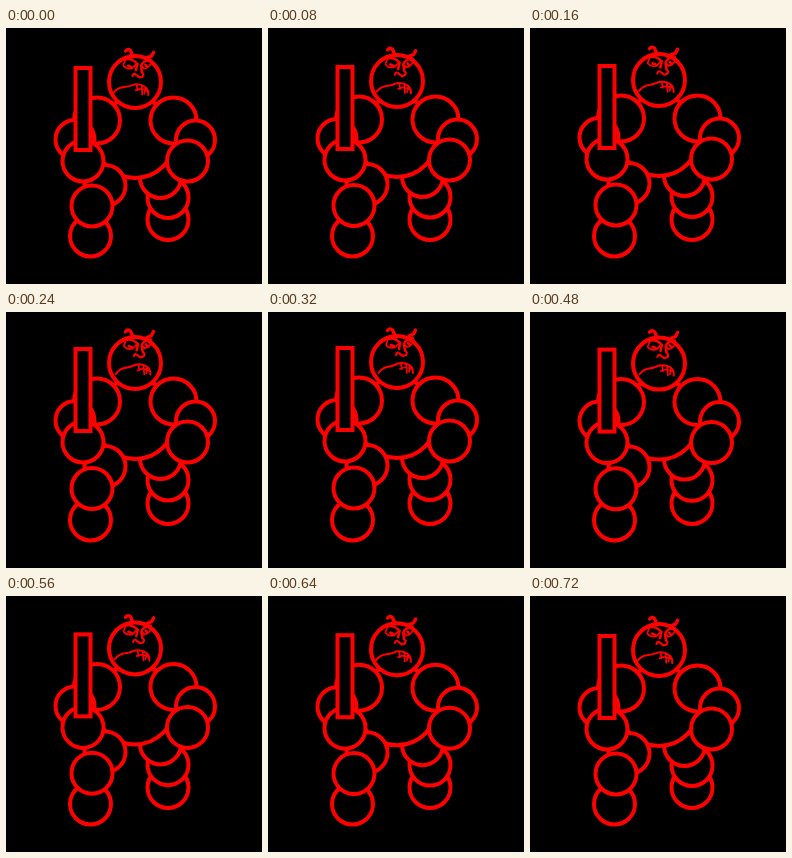
These frames come from a looping animation (256x256 px, 0.8 s). An HTML page:

```html
<!DOCTYPE html>
<html lang="en">
<head>
<meta charset="utf-8">
<title>Breathing guard</title>
<style>
html, body { margin: 0; width: 100%; height: 100%; overflow: hidden; background: #000; }
svg { display: block; width: 100vw; height: 100vh; }
</style>
</head>
<body>
<svg viewBox="0 0 256 256" fill="#000" stroke="#f00" stroke-width="4">
  <g id="body"></g>
  <g id="face" fill="none" stroke-width="1.7" stroke-linecap="round" stroke-linejoin="round">
    <!-- horns -->
    <path stroke-width="3.4" d="M119.500 18.500Q122 15.500 124.500 18L127 23.500M147.500 18L145.500 22L141 24"/>
    <!-- brows and eyes -->
    <path stroke-width="2.4" d="M120 27Q126 25 132 30.500M136 32Q137 27 145 26"/>
    <path d="M120 27L118 33Q121 37 127 35.500L131 31M136 32L139 35Q144 34 146 28"/>
    <path stroke-width="2.6" d="M123 33L126 34M140 31L142 33M132 31L131 37M136 33L137 38"/>
    <!-- nose -->
    <path stroke-width="2.2" d="M128 43Q129 39 132 42L135 44L138 43Q140 40 137 39"/>
    <!-- mouth and teeth -->
    <path stroke-width="2" d="M110.500 61Q114 56 119 55Q125 54 130 51.500Q136 50 141 53Q145 55 145 61"/>
    <path d="M133 52L134 57M138 52L139 61M142 54L141 60M132 57Q137 54 144 57"/>
  </g>
</svg>
<script>
const NS = "http://www.w3.org/2000/svg";
const STEP = 80, STEPS = 10, PEAK = 4, LIFT = 4;
const body = document.getElementById("body");
const face = document.getElementById("face");
const parts = [];

function add(tag, attrs, share) {
  const el = document.createElementNS(NS, tag);
  for (const key in attrs) el.setAttribute(key, attrs[key]);
  body.appendChild(el);
  parts.push({ el, share });
}

// share: how much of the breathing lift the part follows
function ball(cx, cy, r, share = 1) {
  add("circle", { cx, cy, r }, share);
}

// right leg, torso, left leg
ball(162, 191.5, 20.5, 0);
ball(162, 169.5, 20.5, 0.5);
ball(154.5, 149.5, 20.5);
ball(129, 110, 40);
ball(84.5, 208, 20.5, 0);
ball(99, 157.5, 20.5);
ball(86, 178, 20.5, 0.5);
// arms, club and head
ball(91, 92.5, 23);
ball(69, 111.5, 19.5);
ball(77, 133, 20.5);
ball(167.5, 92.5, 23);
ball(189.5, 112, 19.5);
ball(181.5, 133, 20.5);
add("rect", { x: 69.5, y: 40, width: 15, height: 82 }, 1);
ball(129, 54, 26);

function breath(i) {
  return i <= PEAK ? i / PEAK : (STEPS - 1 - i) / (STEPS - 1 - PEAK);
}

function draw(t) {
  const k = breath(Math.floor(t / STEP) % STEPS);
  const sag = 1 - k;
  for (const p of parts) p.el.setAttribute("transform", `translate(0 ${-LIFT * k * p.share})`);
  face.setAttribute("transform", `translate(${-2 * sag} ${5 * sag}) rotate(${4 * sag} 129 50)`);
}

const start = performance.now();
function tick() {
  draw(performance.now() - start);
  requestAnimationFrame(tick);
}
tick();
</script>
</body>
</html>
```
